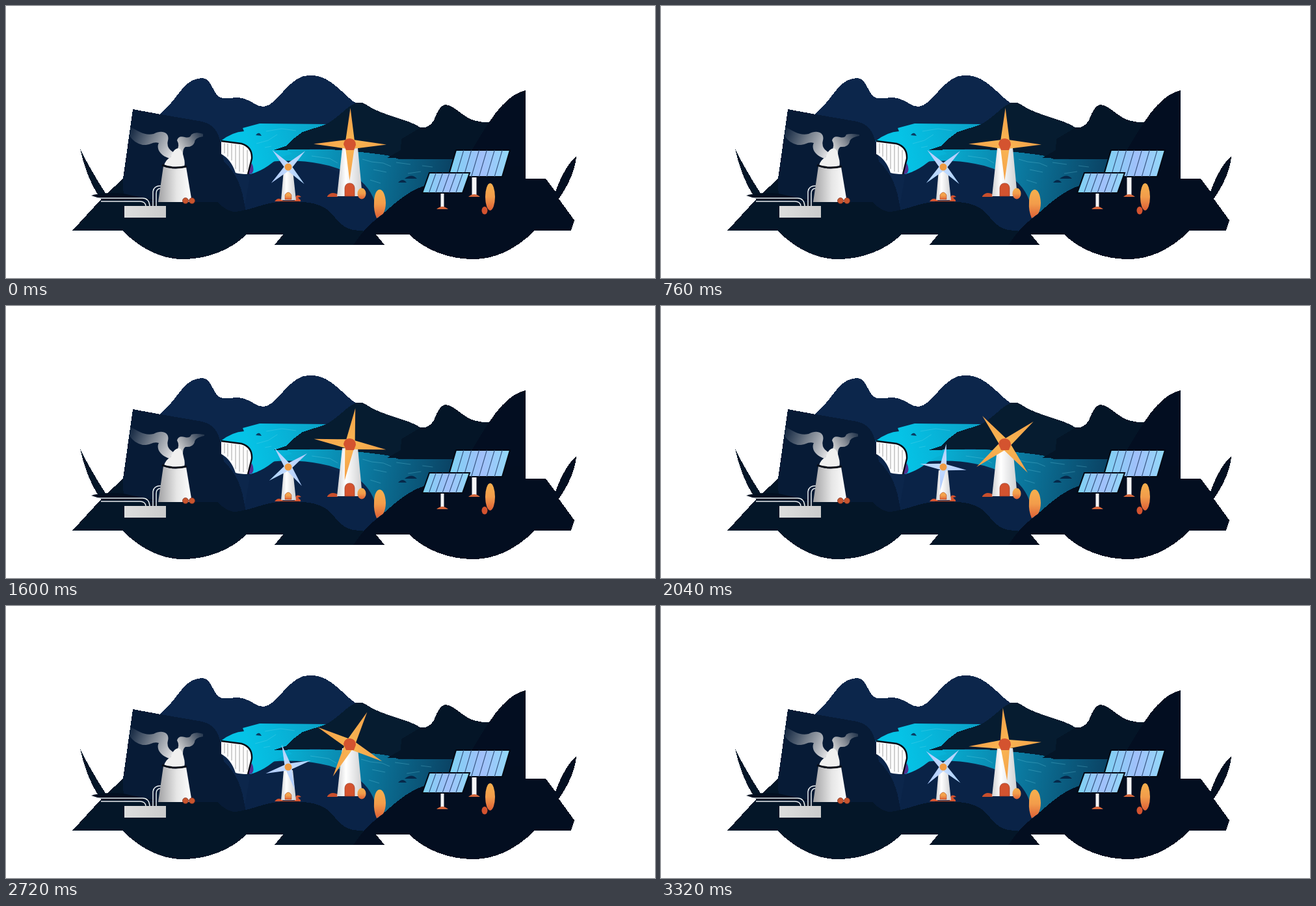
An HTML page for the animation above (3.36 s loop, 998x419 px).

```html
<!DOCTYPE html>
<html lang="en">
<head>
<meta charset="utf-8">
<title>Energy landscape</title>
<style>
html, body { margin: 0; width: 100%; height: 100%; overflow: hidden; background: #fff; }
svg { display: block; width: 100vw; height: 100vh; }
.land { shape-rendering: crispEdges; }
</style>
</head>
<body>
<svg viewBox="0 0 998 419">
  <defs>
    <linearGradient id="water" gradientUnits="userSpaceOnUse" x1="370" y1="200" x2="685" y2="260">
      <stop offset="0" stop-color="#05c3e6"/><stop offset=".25" stop-color="#08a9cd"/>
      <stop offset=".55" stop-color="#0b7fa6"/><stop offset="1" stop-color="#0a4263"/>
    </linearGradient>
    <linearGradient id="lake" gradientUnits="userSpaceOnUse" x1="370" y1="210" x2="495" y2="185">
      <stop offset="0" stop-color="#05c3e6"/><stop offset="1" stop-color="#0b9fc6"/>
    </linearGradient>
    <linearGradient id="wall"><stop offset="0" stop-color="#d0d0d2"/><stop offset=".35" stop-color="#fff"/><stop offset="1" stop-color="#cecfd1"/></linearGradient>
    <linearGradient id="stack"><stop offset="0" stop-color="#a2a2a4"/><stop offset=".55" stop-color="#e6e6e6"/><stop offset="1" stop-color="#fff"/></linearGradient>
    <linearGradient id="crate"><stop offset="0" stop-color="#dedede"/><stop offset="1" stop-color="#cbcbcb"/></linearGradient>
    <linearGradient id="tree" x2="0" y2="1"><stop offset="0" stop-color="#f6b04d"/><stop offset=".5" stop-color="#f29c4b"/><stop offset="1" stop-color="#de5f35"/></linearGradient>
    <linearGradient id="sail" x2="1" y2="1"><stop offset="0" stop-color="#f08b3c"/><stop offset=".5" stop-color="#f9b553"/><stop offset="1" stop-color="#f19140"/></linearGradient>
    <linearGradient id="ice" x2="1" y2="1"><stop offset="0" stop-color="#8fb4f8"/><stop offset=".5" stop-color="#c6dcff"/><stop offset="1" stop-color="#8cc4f5"/></linearGradient>
    <linearGradient id="cell"><stop offset="0" stop-color="#7cd3f2"/><stop offset=".55" stop-color="#a1c0fb"/><stop offset="1" stop-color="#90daf8"/></linearGradient>
    <linearGradient id="plumeL" gradientUnits="userSpaceOnUse" x1="190" y1="195" x2="258" y2="228">
      <stop offset="0" stop-color="#8995a3" stop-opacity=".12"/><stop offset=".45" stop-color="#a0a5ac" stop-opacity=".7"/><stop offset="1" stop-color="#e9e9ea"/>
    </linearGradient>
    <linearGradient id="plumeR" gradientUnits="userSpaceOnUse" x1="264" y1="225" x2="305" y2="200">
      <stop offset="0" stop-color="#e2e2e2"/><stop offset=".5" stop-color="#a7a9ad" stop-opacity=".8"/><stop offset="1" stop-color="#7d8793" stop-opacity=".25"/>
    </linearGradient>
  </defs>

  <!-- far hills and water -->
  <path class="land" fill="#0c264b" d="M236 167C267 142 272 111 303 111C318 113 318 140 333 142C347 143 354 139 367 143C380 147 384 155 396 155C418 154 434 106.500 468 106.500C502 106.500 520 141 542 152L600 240L572 350H330L300 200Z"/>
  <path fill="#0a2347" d="M376 258Q410 238 450 238Q520 248 575 300V350H360Z"/>
  <path fill="url(#water)" d="M405 240L414 221H500L600 228L690 236V285L620 300L572 328Q570 290 545 269Q518 249 483 243Q448 236 405 240Z"/>
  <path fill="url(#lake)" d="M330 208Q348 194 366 193L364 188L390 181L492 182L460 197L430 219L440 228Q422 231 410 241Q394 254 376 259Z"/>
  <g id="ripples" fill="none" stroke="#7cd9ec" stroke-width=".7" opacity=".4">
    <path d="M400 193l24-4 22 3M385 212l18-5 14-9M398 218l10-2M470 231l28 4 12 7M548 236l14 4 18 2 12 5M565 252l20 4M600 241l22 3M618 258l20-3M560 268l16 5M640 246l16 2"/>
  </g>
  <path fill="#0a3c62" d="M384 199Q389 192 393 200Z"/>
  <path fill="#06294a" d="M613 266Q624 257 632 266ZM603 272Q610 264 616 272Z"/>

  <!-- middle hills -->
  <path class="land" fill="#061c30" d="M411 222L430 216L440 206L456 194L491 183C512 172 524 154 539 149Q548 147 557 154C580 169 618 174 637 187L690 200V236H604L586 230Q500 218 455 221Z"/>
  <path class="land" fill="#041527" d="M586 234L607 222L608 205L638 187Q650 189 658 176Q667 152 676 152C689 153 703 171 719 176Q732 180 746 179L735 236H640Z"/>
  <path class="land" fill="#030e21" d="M690 262C716 226 724 207 743 179C761 151 780 134 799 130V275H690Z"/>

  <!-- left cliff and ground -->
  <path class="land" fill="#071b36" d="M195 159L238 167L296 177Q322 180 329 206L335 240Q356 258 364 291L370 322H180V266Z"/>
  <path class="land" fill="#041628" d="M114 220Q128 249 154 290L180 266L181 302H325Q340 317 353 317C383 313 400 301 432 301C470 301 487 305 501 320C517 340 525 346 548 346L582 368H413L426 352H370C345 376 310 390 272 390C237 390 205 372 179 346H102L146 298Q124 266 114 220Z"/>
  <path class="land" fill="#030e20" d="M534 368Q553 340 571 327C594 309 612 287 646 276Q675 267 690 260L799 245V266H830L845 286Q858 249 877 231Q875 261 850 297L874 330L869 346H813C787 372 755 390 719 390C680 390 645 376 620 352H569L582 368Z"/>
  <path fill="#020f20" d="M131 292Q150 286 181 289L232 300L150 298Z"/>

  <!-- dam -->
  <path fill="#51318e" d="M371 259L378 242Q383 253 378 258Z"/>
  <path fill="#fff" d="M331 208L362 212Q379 217 378 235L372 259Q361 259 353 257Q346 236 331 228Z"/>
  <path stroke="#8b8b8b" stroke-width=".8" d="M336 211v16M341 212v20M347 212v26M353 213v38M359 214v41M365 216v40M371 222v30"/>
  <path fill="none" stroke="#050914" stroke-width="2.4" d="M331 208L362 212Q379 217 378 235L372 259"/>

  <!-- steam plant -->
  <g fill="none" stroke="#e9edf0" stroke-width="1.5">
    <path d="M138 296H210Q220 296 221 308M146 301H206Q214 301 215 308M226 308V286Q227 277 238 277M231 308V289Q231 281 238 281"/>
  </g>
  <path fill="url(#crate)" d="M182 308h64v18h-64z"/>
  <path fill="url(#plumeL)" d="M191 186C205 194 214 200 227 197C240 190 252 195 249 207Q246 219 257 225L252 235C235 230 231 218 235 211C226 208 222 215 210 214Q197 211 190 200Z"/>
  <path id="wisp" fill="url(#plumeR)"/>
  <path id="dome" fill="#f0f0ef"/>
  <path fill="url(#stack)" d="M242 247Q259 253 277 248L286 302H234Z"/>
  <path fill="none" stroke="#070d18" stroke-width="3" d="M240 245Q257 252 278 247"/>
  <g fill="#c9562f" stroke="#722b22" stroke-width=".7"><circle cx="276" cy="300" r="4.5"/><circle cx="286" cy="300" r="4.5"/></g>

  <!-- small mill -->
  <path fill="#d4532f" d="M413 301Q419 293 426 300H444Q445 287 454 294L449 295L453 299V301Z"/>
  <path fill="url(#wall)" d="M427 253H441L446 299H423Z"/>
  <path fill="url(#tree)" stroke="#a94528" stroke-width=".6" d="M429 298V291Q434 283 439 291V298Z"/>
  <g id="smallSails"></g>
  <circle cx="434" cy="248" r="5.5" fill="#ee9b43"/>

  <!-- large mill -->
  <path fill="#c94f2c" d="M494 293Q500 285 510 290V294H494Z"/>
  <path fill="url(#wall)" d="M517 219H541L548 293H509Z"/>
  <path fill="#d4532f" stroke="#9b3925" stroke-width=".7" d="M521 293V280Q522 273 528.500 273Q535 273 536 280V293Z"/>
  <ellipse cx="547" cy="289" rx="6.500" ry="8.500" fill="url(#tree)"/>
  <g id="largeSails"></g>
  <path fill="#d4532f" d="M519 213Q520 204 529 204Q538 205 538 214L535 222H523Z"/>

  <!-- trees and panels -->
  <path fill="url(#tree)" d="M570 327Q565 315 566 303C566 276 583 276 584 303Q584 313 580 320Z"/>
  <ellipse cx="744.500" cy="294" rx="7.500" ry="21" fill="url(#tree)"/>
  <ellipse cx="736" cy="315" rx="4.500" ry="6" fill="#d4532f"/>
  <g id="panels"></g>
</svg>
<script>
const LOOP = 3360, HALF_TURN = 1520;
const byId = id => document.getElementById(id);

function star(tip, waist) {
  return Array.from({ length: 8 }, (_, i) => {
    const angle = i * Math.PI / 4, r = i % 2 ? waist : tip;
    return `${Math.sin(angle) * r},${-Math.cos(angle) * r}`;
  }).join(' ');
}

function addSails(id, tip, waist, fill) {
  byId(id).innerHTML = `<polygon points="${star(tip, waist)}" fill="${fill}"/>`;
}

function panel(x, y, width, height, skew, cells, postX, footY) {
  const seams = Array.from({ length: cells - 1 }, (_, i) =>
    `M${x + (i + 1) * width / cells} ${y}l${-skew} ${height}`).join('');
  return `<path d="M${postX} ${y + height}V${footY - 2}" stroke="#f5f5f6" stroke-width="${cells > 6 ? 7 : 5}"/>
    <path d="M${postX - 9} ${footY + 1}Q${postX} ${footY - 7} ${postX + 9} ${footY + 1}Z" fill="#d4653a"/>
    <path d="M${x} ${y}h${width}l${-skew} ${height}h${-width}Z" fill="url(#cell)" stroke="#030913" stroke-width="2"/>
    <path d="${seams}" stroke="#34517c" stroke-width="1.1"/>`;
}

addSails('largeSails', 56, 9.5, 'url(#sail)');
addSails('smallSails', 36, 6.5, 'url(#ice)');
byId('panels').innerHTML =
  panel(692, 222, 83, 41, 12, 7, 720, 293) + panel(651, 257, 62, 31, 11, 6, 671, 312);

// The second half turn is slower than the first.
function millAngle(t) {
  return t < HALF_TURN
    ? 180 * t / HALF_TURN
    : 180 + 180 * (t - HALF_TURN) / (LOOP - HALF_TURN);
}

function pulse(t, center, radius) {
  const d = Math.abs(t - center);
  return d < radius ? Math.cos(d / radius * Math.PI / 2) ** 2 : 0;
}

function draw(t) {
  const angle = millAngle(t) + 0.5;
  byId('largeSails').setAttribute('transform', `translate(529 213) rotate(${angle})`);
  byId('smallSails').setAttribute('transform', `translate(434 248) rotate(${angle - 44})`);

  const flat = pulse(t, 760, 400) + pulse(t, 1600, 400);
  const puff = pulse(t, 3000, 280);
  const tipX = 303 + 2 * flat, tipY = 201 - flat + 3 * puff;
  byId('wisp').setAttribute('d',
    `M262 224Q268 215 263 207Q265 199 275 202Q283 204 285 198Q291 ${193 + 3 * flat} ${tipX} ${197 + flat}
     L${tipX} ${tipY}Q${290 + 2 * puff} ${203 + 4 * puff} 290 210Q287 218 276 217Q272 219 272 228Z`);
  byId('dome').setAttribute('d',
    `M243 246Q245 237 253 233Q257 220 ${265 + flat} 219Q271 ${221 - flat} 273 232Q276 242 274 247Q257 250 243 246Z`);
  byId('ripples').setAttribute('transform', `translate(${2 * Math.sin(t / LOOP * 2 * Math.PI)} 0)`);
}

function tick(now) {
  draw(now % LOOP);
  requestAnimationFrame(tick);
}
draw(0);
requestAnimationFrame(tick);
</script>
</body>
</html>
```
